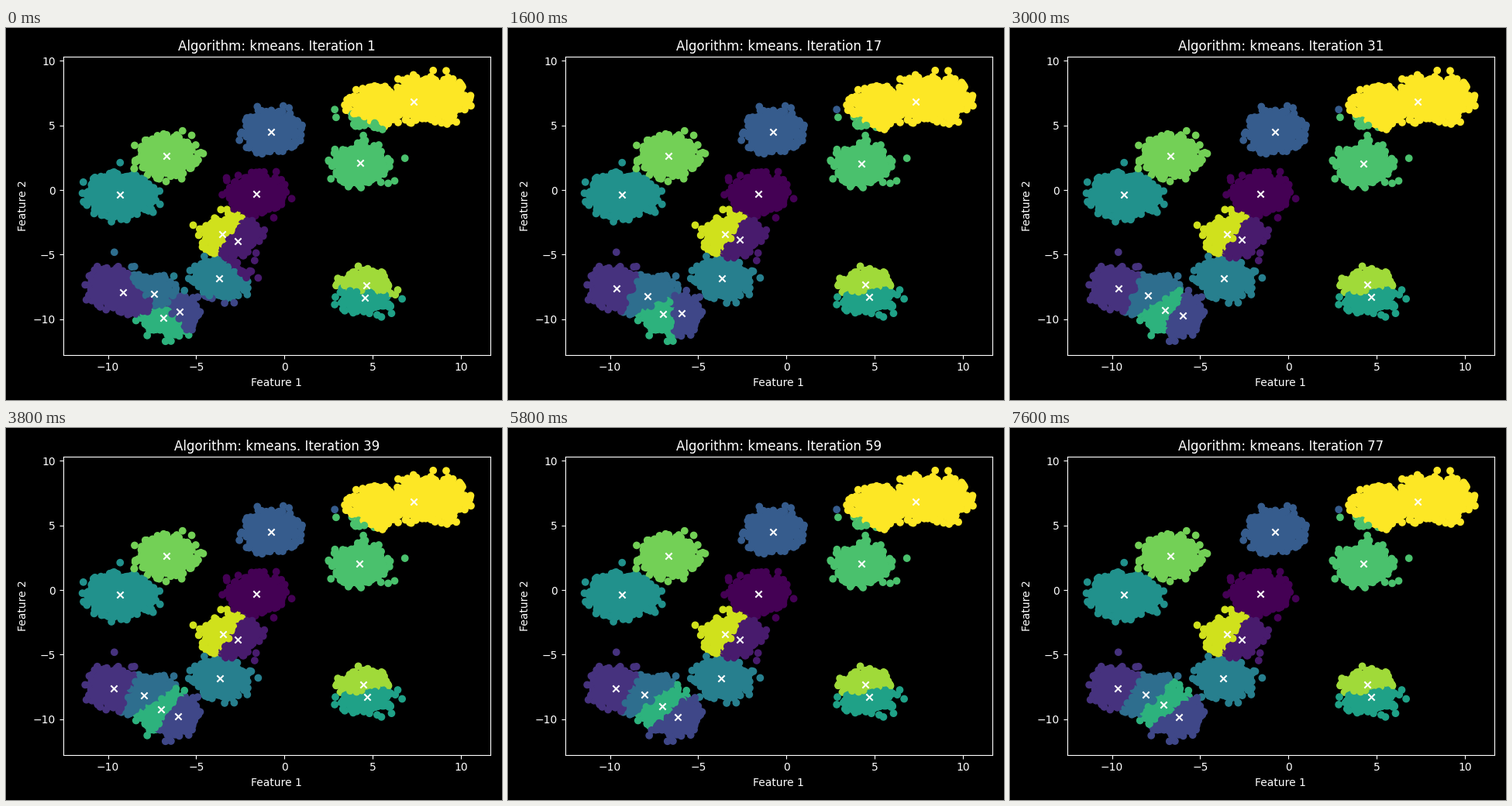
A matplotlib script for the animation above (7.7 s loop, 640 by 480 pixels).

```python
import matplotlib.pyplot as plt
import numpy as np
from matplotlib.animation import FuncAnimation

K = 15
SAMPLES = 15000
STD = 0.6
STEPS = 77
INTERVAL = 100

# Blob in which each centroid starts; some blobs hold two of them.
HOMES = [2, 11, 12, 0, 1, 12, 9, 14, 5, 0, 13, 7, 5, 11, 6]
# Direction, in degrees, from a shared blob's center to its first centroid.
SPLITS = {0: 34, 5: 260, 11: -30, 12: 211}
SPREAD = 0.8
# Lone centroids that start away from their blob's center.
PULLS = {6: (-1.3, 0.2), 10: (0, 0.8), 14: (-1.1, 0)}


def make_blobs(samples, k, std, seed):
    """Shuffled Gaussian blobs around uniformly drawn centers."""
    rng = np.random.RandomState(seed)
    centers = rng.uniform(-10, 10, size=(k, 2))
    points = np.concatenate([
        rng.normal(loc=c, scale=std, size=(samples // k, 2)) for c in centers
    ])
    order = np.arange(len(points))
    rng.shuffle(order)
    return points[order], centers


def start_centroids(centers):
    start = centers[HOMES]
    for blob, angle in SPLITS.items():
        first, second = np.flatnonzero(np.equal(HOMES, blob))
        a = np.radians(angle)
        step = SPREAD * np.array([np.cos(a), np.sin(a)])
        start[first] += step
        start[second] -= step
    for label, pull in PULLS.items():
        start[label] += pull
    return start


def kmeans(points, centroids, steps):
    """Yield labels and updated centroids after each Lloyd step."""
    for _ in range(steps):
        dist = ((points[:, None] - centroids) ** 2).sum(axis=2)
        labels = dist.argmin(axis=1)
        centroids = np.array([points[labels == j].mean(axis=0)
                              for j in range(len(centroids))])
        yield labels, centroids


points, centers = make_blobs(SAMPLES, K, STD, seed=11)
history = list(kmeans(points, start_centroids(centers), STEPS))

plt.style.use("dark_background")
fig, ax = plt.subplots(figsize=(6.4, 4.8), dpi=100)
dots = ax.scatter(points[:, 0], points[:, 1], c=history[0][0],
                  cmap="viridis", vmin=0, vmax=K - 1)
marks = ax.scatter(*history[0][1].T, c="white", marker="x")
ax.set_xlabel("Feature 1")
ax.set_ylabel("Feature 2")
title = ax.set_title("Algorithm: kmeans. Iteration 1")
fig.tight_layout()


def update(i):
    labels, centroids = history[i]
    dots.set_array(labels)
    marks.set_offsets(centroids)
    title.set_text(f"Algorithm: kmeans. Iteration {i + 1}")
    return dots, marks, title


anim = FuncAnimation(fig, update, frames=STEPS, interval=INTERVAL,
                     repeat=True, repeat_delay=0)
plt.show()
```
